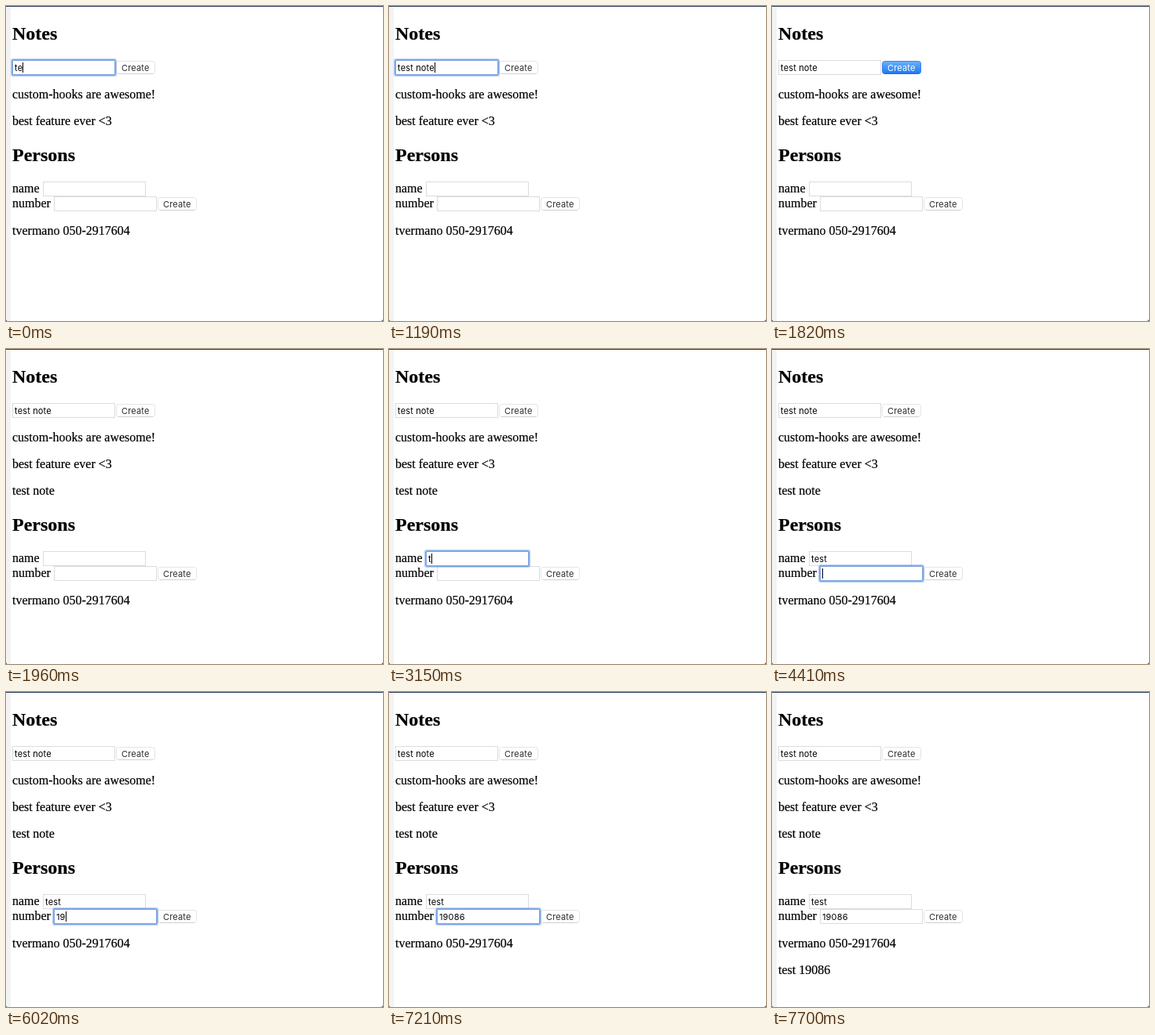
An HTML page that plays this animation: 480 px wide and 402 px high, repeating every 8470 ms.

```html
<!DOCTYPE html>
<html lang="en">
<head>
<meta charset="utf-8">
<title>Notes and persons</title>
<style>
  html, body { margin: 0; width: 100%; height: 100%; overflow: hidden; background: #2c3a5c; }
  svg { display: block; }
  text { font: 16px "Liberation Serif", serif; white-space: pre; stroke: #000; stroke-width: .2px; }
  .head { font-size: 24px; font-weight: bold; }
  .ui { font: 11px Inter, sans-serif; letter-spacing: .15px; stroke: none; }
  .label { fill: #2e2e2e; }
  .box { fill: #fff; stroke: #dcdcdc; }
  .ring { fill: none; stroke: #6496e4; }
  .button { fill: #fff; stroke: #e4e4e4; }
  .edge { stroke: #d0d0d0; }
  .pressed .button { fill: url(#blue); stroke: #3f83ee; }
  .pressed .edge { stroke: #2c6bdc; }
  .pressed .label { fill: #fff; }
</style>
</head>
<body>
<svg id="stage" width="480" height="402" viewBox="0 0 480 402">
  <defs>
    <linearGradient id="blue" x2="0" y2="1">
      <stop stop-color="#6cb3fa"/>
      <stop offset="1" stop-color="#1a76f6"/>
    </linearGradient>
  </defs>
  <path d="M0 1H480V399Q480 402 477 402H3Q0 402 0 399Z" fill="#fff"/>
  <path d="M0 1H6V402H3Q0 402 0 399Z" fill="#f3f3f3"/>
  <text class="head" x="8" y="43">Notes</text>
  <text x="8" y="118">custom-hooks are awesome!</text>
  <text x="8" y="152">best feature ever &lt;3</text>
  <text x="8" y="186" id="newNote">test note</text>
  <g id="persons">
    <text class="head" x="8" y="198">Persons</text>
    <text x="8" y="238">name</text>
    <text x="8" y="257">number</text>
    <text x="8" y="292">tvermano 050-2917604</text>
    <text x="8" y="326" id="newPerson">test 19086</text>
  </g>
</svg>
<script>
const LOOP = 8470;
const stage = document.getElementById('stage');
const persons = document.getElementById('persons');
const newNote = document.getElementById('newNote');
const newPerson = document.getElementById('newPerson');

function add(parent, tag, attrs, content = '') {
  const el = document.createElementNS('http://www.w3.org/2000/svg', tag);
  for (const key in attrs) el.setAttribute(key, attrs[key]);
  el.textContent = content;
  parent.append(el);
  return el;
}

const show = (el, on) => el.setAttribute('visibility', on ? 'visible' : 'hidden');
const within = (t, [from, to]) => t >= from && t < to;

// keys: the time at which each character appears
function makeInput(parent, x, y, value, keys, focus, caretOff) {
  const g = add(parent, 'g', {});
  add(g, 'rect', { class: 'box', x: x + .5, y: y + .5, width: 130, height: 18 });
  // Soft focus ring: one-pixel bands fading outwards
  const ring = add(g, 'g', { class: 'ring' });
  for (const [out, opacity] of [[-.5, .75], [.5, .85], [1.5, .4], [2.5, .08]]) {
    add(ring, 'rect', {
      x: x - out, y: y - out, width: 131 + 2 * out, height: 19 + 2 * out,
      rx: out + .5, 'stroke-opacity': opacity
    });
  }
  const text = add(g, 'text', { class: 'ui', x: x + 3, y: y + 14 });
  const caret = add(g, 'rect', { y: y + 3, width: 1, height: 13 });
  return t => {
    const typed = value.slice(0, keys.filter(k => t >= k).length);
    if (text.textContent !== typed) text.textContent = typed;
    const focused = within(t, focus);
    if (focused) g.parentNode.append(g);
    show(ring, focused);
    show(caret, focused && !caretOff.some(span => within(t, span)));
    caret.setAttribute('x', Math.round(x + 3 + (typed ? text.getComputedTextLength() : 0)));
  };
}

function makeButton(parent, x, y, press) {
  const g = add(parent, 'g', {});
  add(g, 'rect', { class: 'button', x: x + .5, y: y + .5, width: 49, height: 16, rx: 3 });
  add(g, 'path', { class: 'edge', d: `M${x + 3} ${y + 16.5}h44` });
  add(g, 'text', { class: 'ui label', x: x + 7, y: y + 13 }, 'Create');
  return t => g.setAttribute('class', within(t, press) ? 'pressed' : '');
}

const parts = [
  makeButton(stage, 140, 70, [1820, 1960]),
  makeButton(persons, 193, 244, [7630, 7700]),
  makeInput(stage, 8, 69, 'test note', [0, 0, 70, 490, 560, 770, 910, 980, 1190],
    [0, 1820], [[1680, 1820]]),
  makeInput(persons, 47, 224, 'test', [3150, 3290, 3430, 3500],
    [2590, 4410], [[4060, 4410]]),
  makeInput(persons, 61, 243, '19086', [5810, 6020, 6300, 6510, 6720],
    [4410, 7630], [[4970, 5460], [7210, 7630]])
];

function draw(now) {
  const t = now % LOOP;
  show(newNote, t >= 1960);
  show(newPerson, t >= 7700);
  persons.setAttribute('transform', `translate(0 ${t >= 1960 ? 34 : 0})`);
  for (const update of parts) update(t);
}

const start = performance.now();
function tick() {
  draw(performance.now() - start);
  requestAnimationFrame(tick);
}
tick();
</script>
</body>
</html>
```
